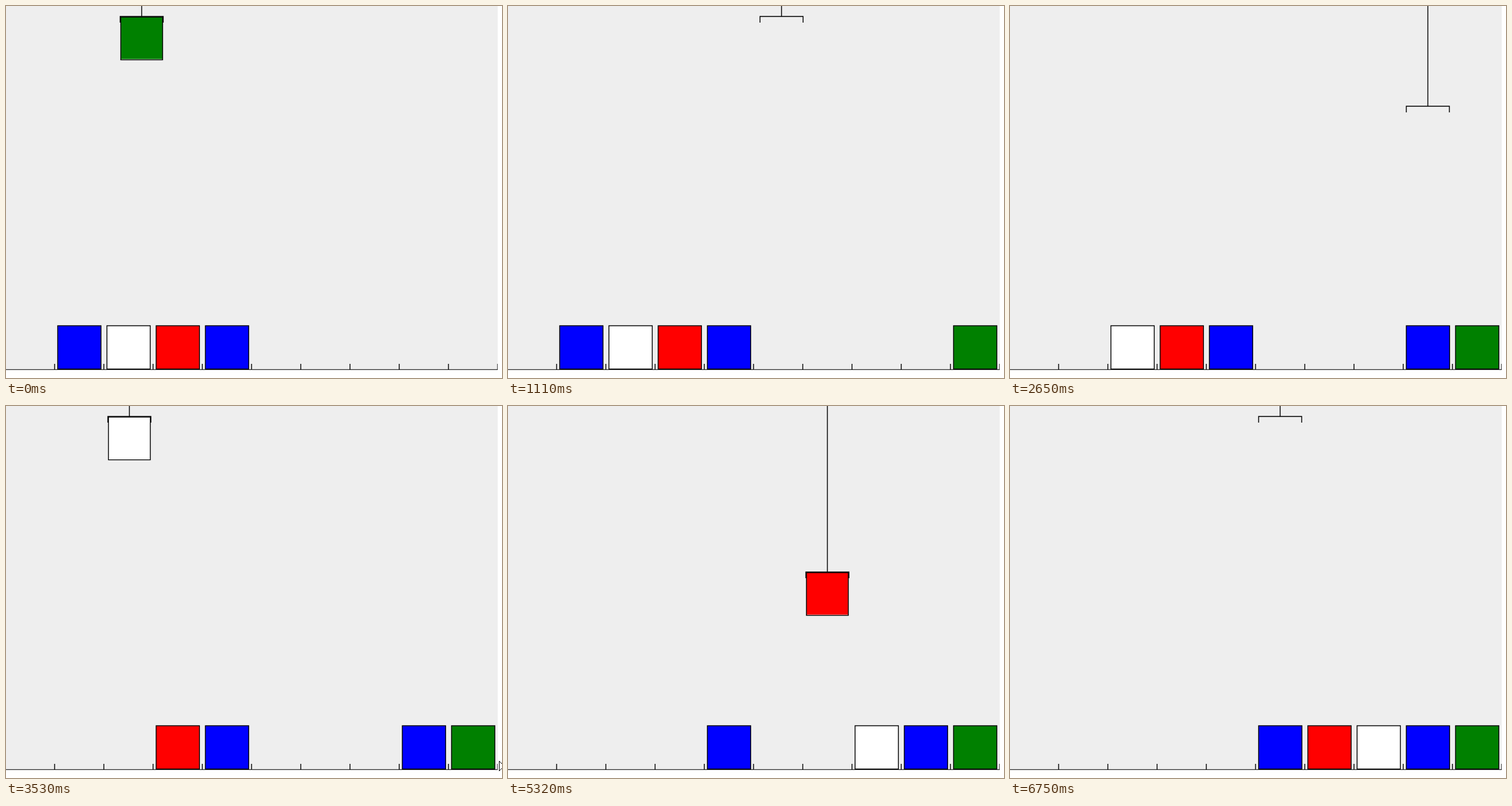
Recreate the animation shown at these times as an HTML page with a canvas. Size 806x605 px, loop 7.22 s.

```html
<!DOCTYPE html>
<html lang="en">
<head>
<meta charset="utf-8">
<title>Robot arm</title>
<style>
html, body { margin: 0; width: 100%; height: 100%; overflow: hidden; background: #fff; }
canvas { display: block; }
</style>
</head>
<body>
<canvas id="stage" width="806" height="605"></canvas>
<script>
const ctx = document.getElementById('stage').getContext('2d');
const LOOP = 7220, W = 799, H = 592;
const TOP = 17, LOW = 520, FLOOR = 591.3;
const SPEED = 1.304;   // sideways, px per ms
const START_X = 219, PITCH = 80, HALF = 35;
const colX = c => 39 + PITCH * c;

// Moments at which the arm is back up after each visit to a column.
const lifts = [870, 1818, 2720, 3530, 4328, 5023, 5659, 6234, 6746];

// Visits alternate: drop from the right end inwards, grab from the left.
const visits = [];
lifts.forEach((up, i) => {
  const last = visits[i - 1] || { x: START_X, up: 0 };
  const col = i % 2 ? (i + 1) / 2 : 9 - i / 2;
  const x = colX(col);
  const over = last.up + Math.abs(x - last.x) / SPEED;
  visits.push({ col, x, from: last.x, start: last.up, over, low: (over + up) / 2, up, grab: i % 2 });
});

const mix = (a, b, t, t0, t1) => a + (b - a) * (t - t0) / (t1 - t0);

function armAt(t) {
  const v = visits.find(v => t < v.up);
  if (!v) return { x: visits[visits.length - 1].x, y: TOP };
  if (t < v.over) return { x: mix(v.from, v.x, t, v.start, v.over), y: TOP };
  const y = t < v.low ? mix(TOP, LOW, t, v.over, v.low) : mix(LOW, TOP, t, v.low, v.up);
  return { x: v.x, y };
}

function blocksAt(t) {
  const cols = { 1: '#00f', 2: '#fff', 3: '#f00', 4: '#00f' };
  let held = '#008000';
  for (const v of visits) {
    if (t < v.low) break;
    if (v.grab) {
      held = cols[v.col];
      delete cols[v.col];
    } else {
      cols[v.col] = held;
      held = null;
    }
  }
  return { cols, held };
}

function line(...p) {
  ctx.beginPath();
  for (let i = 0; i < p.length; i += 2) ctx.lineTo(p[i], p[i + 1]);
  ctx.stroke();
}

function box(x, y, w, h, color) {
  ctx.fillStyle = color;
  ctx.fillRect(x, y, w, h);
  ctx.strokeRect(x, y, w, h);
}

// A carried block sits just inside the claw, with a pale lower rim.
function drawHeld(x, y, color) {
  box(x - HALF + 1, y + 1, 2 * HALF - 2, 69.5, color);
  ctx.fillStyle = 'rgba(255,255,255,.5)';
  ctx.fillRect(x - HALF + 2, y + 69, 2 * HALF - 4, 1);
}

function drawPointer() {
  ctx.lineWidth = 1;
  ctx.fillStyle = '#fff';
  ctx.beginPath();
  ctx.moveTo(801.5, 577.5);
  ctx.lineTo(801.5, 593.5);
  ctx.lineTo(805.5, 589.5);
  ctx.lineTo(813, 589);
  ctx.closePath();
  ctx.fill();
  ctx.stroke();
}

function draw(t) {
  ctx.fillStyle = '#fff';
  ctx.fillRect(0, 0, 806, 605);
  ctx.strokeStyle = '#000';
  ctx.save();
  ctx.beginPath();
  ctx.rect(0, 0, W, H);
  ctx.clip();
  ctx.fillStyle = '#eee';
  ctx.fillRect(0, 0, W, H);

  ctx.lineWidth = 1;
  line(0, FLOOR, W, FLOOR);
  ctx.lineWidth = 1.4;
  for (let x = PITCH - 1; x <= W; x += PITCH) line(x, 582, x, FLOOR);

  const { cols, held } = blocksAt(t);
  for (const c in cols) box(colX(+c) - HALF, LOW, 70.4, 70.4, cols[c]);

  const arm = armAt(t);
  const x = Math.round(arm.x * 2) / 2, y = Math.floor(arm.y);
  if (held) drawHeld(x, y, held);
  line(x, 0, x, y);
  line(x - HALF, y + 10, x - HALF, y, x + HALF, y, x + HALF, y + 10);
  ctx.restore();

  if (t >= 3430 && t < 3820) drawPointer();
}

const begin = performance.now();
function loop() {
  draw((performance.now() - begin) % LOOP);
  requestAnimationFrame(loop);
}
loop();
</script>
</body>
</html>
```
